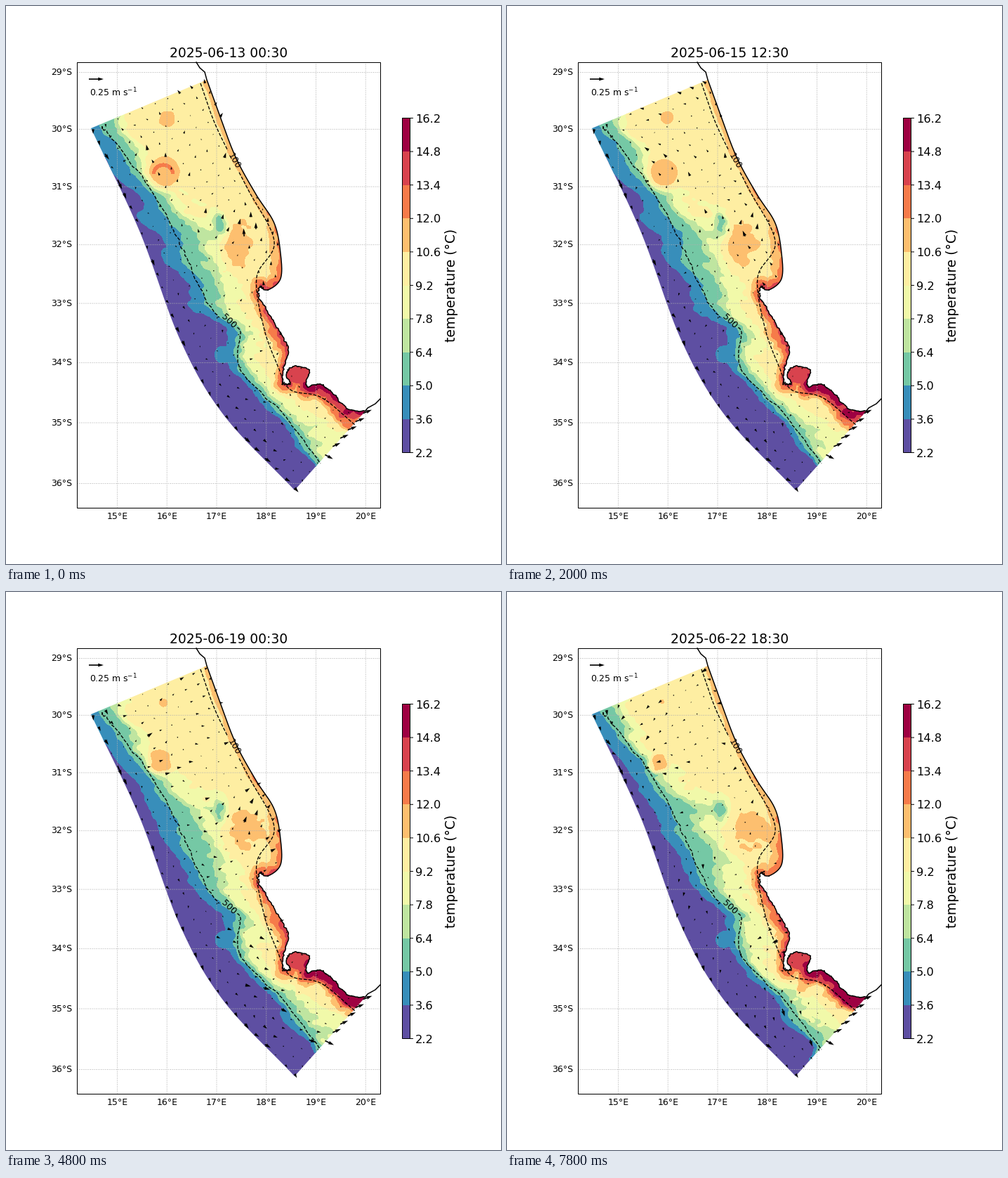
A matplotlib script for the animation above (8 s loop, 705 by 794 pixels).

```python
import numpy as np
import matplotlib.pyplot as plt
from matplotlib.animation import FuncAnimation
from matplotlib.patches import Polygon, Rectangle
from matplotlib.path import Path

W, H, FRAMES = 705, 794, 40
PT = 0.72  # points per pixel at 100 dpi
LEVELS = 2.2 + 1.4 * np.arange(11)
CMAP = plt.get_cmap("Spectral_r", 10)
START = np.datetime64("2025-06-13T00:30")
rng = np.random.default_rng(11)

plt.rcParams["font.family"] = "DejaVu Sans"
fig = plt.figure(figsize=(W / 100, H / 100), dpi=100, facecolor="white")
ax = fig.add_axes([0, 0, 1, 1])
ax.set_xlim(0, W)
ax.set_ylim(H, 0)
ax.axis("off")


def curve(keys, n=20):
    """Catmull-Rom spline through the key points, n samples per span."""
    p = np.array(keys, float)
    q = np.vstack([2 * p[0] - p[1], p, 2 * p[-1] - p[-2]])
    a, b, c, d = q[:-3], q[1:-2], q[2:-1], q[3:]
    t = np.linspace(0, 1, n, endpoint=False)[:, None, None]
    spans = 0.5 * (2 * b + (c - a) * t + (2 * a - 5 * b + 4 * c - d) * t ** 2
                   + (3 * b - a - 3 * c + d) * t ** 3)
    return np.vstack([spans.swapaxes(0, 1).reshape(-1, 2), p[-1]])


def resample(pts, n):
    along = np.r_[0, np.cumsum(np.hypot(*np.diff(pts, axis=0).T))]
    s = np.linspace(0, along[-1], n)
    return np.c_[np.interp(s, along, pts[:, 0]), np.interp(s, along, pts[:, 1])]


def roughen(pts, size):
    noise = rng.normal(0, 1, pts.shape)
    return pts + size * (noise + np.roll(noise, 1, 0) + np.roll(noise, 2, 0)) / 1.7


def line(pts, width, style="-", color="black", z=5):
    ax.plot(*np.transpose(pts), style, color=color, lw=width * PT, zorder=z, snap=False)


def label(x, y, text, px, **kw):
    kw = {"ha": "center", "va": "center", "zorder": 8, **kw}
    return ax.text(x, y, text, fontsize=px * PT, **kw)


def isobath(pts, x, y, text, rotation):
    pts = pts.copy()
    pts[np.hypot(*(pts - [x, y]).T) < 14] = np.nan
    line(pts, 1.3, "--")
    label(x, y, text, 12.5, rotation=rotation)


# Geography, in stage pixels
SMOOTH = curve([(286, 105), (303, 152), (327, 215), (356, 268), (382, 309), (391, 352),
                (391, 388), (373, 404), (362, 399), (360, 413), (371, 433), (389, 462),
                (402, 488), (396, 514), (394, 535), (404, 538), (400, 521), (413, 513),
                (431, 518), (428, 541), (448, 539), (467, 552), (485, 572), (512, 578)])
KNOT = np.arange(len(SMOOTH)) / 20
COAST = np.where(KNOT[:, None] > 7, roughen(SMOOTH, 0.7), SMOOTH)
EDGE = curve([(121, 174), (190, 320), (248, 475), (310, 582), (411, 689)])
INNER = curve([(285, 107), (394, 350), (425, 450), (511, 580)])
SHALLOW = curve([(277, 110), (300, 173), (343, 258), (382, 335), (357, 386), (367, 457),
                 (387, 512), (405, 546), (449, 557), (497, 596)])
DEEP = curve([(135, 171), (152, 190), (208, 263), (241, 325), (265, 375), (296, 436),
              (332, 461), (333, 517), (390, 575), (448, 650)])
DOMAIN = np.vstack([COAST, EDGE[::-1]])

xs, ys = np.arange(116, 520, 2.0), np.arange(100, 696, 2.0)
X, Y = np.meshgrid(xs, ys)

# Distance to the coast, and the place along it that is nearest
shore, place = np.full(X.shape, 1e3), np.zeros(X.shape)
for k, (px, py) in zip(KNOT, COAST):
    d = np.hypot(X - px, Y - py)
    place[d < shore] = k
    shore = np.minimum(shore, d)
PEAK = np.interp(place, [0, 5, 7, 9, 11, 15, 19, 21, 23],
                 [11.7, 12.2, 14.3, 13.2, 14.3, 13.8, 14.8, 16, 16.4])
REACH = np.interp(place, [0, 3, 6, 9, 11, 13, 19, 23], [5, 6, 19, 9, 18, 9, 22, 25])

# The fronts follow the shelf break
down = DEEP[np.argsort(DEEP[:, 1])]
BREAK = np.mean([np.interp(ys + k, down[:, 1], down[:, 0])
                 for k in range(-12, 13, 4)], axis=0)


def make_waves(n, short, long):
    turn, size = rng.uniform(0, 2 * np.pi, n), rng.uniform(short, long, n)
    return np.c_[2 * np.pi * np.cos(turn) / size, 2 * np.pi * np.sin(turn) / size,
                 rng.uniform(0, 2 * np.pi, n), rng.normal(0, 0.07, n)]


def ripple(waves, x, y, i):
    total = sum(np.sin(kx * x + ky * y + ph + w * i) for kx, ky, ph, w in waves)
    return total / np.sqrt(len(waves))


BROAD, FINE = make_waves(9, 28, 75), make_waves(8, 13, 30)
SWIRL_U, SWIRL_V = make_waves(8, 45, 110), make_waves(8, 45, 110)


def shelf_water(x, t):
    s = (ys - 170) / 490
    bulge = np.exp(-((ys - 355) / 75) ** 4)
    corner = 14 * np.exp(-((ys - 165) / 25) ** 2)
    cape = 50 / (1 + np.exp((592 - ys) / 7))
    spread = 32 * t * np.exp(-((ys - 305) / 32) ** 2)
    offsets = [-92 + 25 * s, -32 + 25 * s, -4 + 0 * s,
               7 + (24 - 4 * t) * bulge + corner, 13 + 31 * bulge + corner,
               24 + 14 * s + 38 * bulge + corner + cape + spread]
    knots = BREAK + np.array(offsets + [offsets[-1] + 35])
    temps = [2.5, 3.6, 5.0, 6.4, 7.8, 9.2, 9.9]
    return np.array([np.interp(row, k, temps) for row, k in zip(x, knots.T)])


def temperature(i):
    t = i / (FRAMES - 1)
    a, b = ripple(BROAD, X, Y, i), ripple(FINE, X, Y, i)
    T = shelf_water(X + (2.6 * a + 1.6 * b) * np.clip((X - 130) / 60, 0.3, 1), t)
    T += (0.4 * a + 0.3 * b) * np.exp(-((T - 7.6) / 1.8) ** 2) + 0.08 * a

    def blend(goal, cx, cy, rx, ry, power, rough=0.0):
        r = np.hypot((X - cx) / rx, (Y - cy) / ry) + rough * (a + b)
        T[:] += (goal - T) * np.exp(-np.abs(r) ** power)

    # Eddy with a warm arc, northern patch, warm pool, cool spots, enclosed bay
    ex, ey, er = 224 - 8 * t, 237 + 5 * t, 25 - 13 * t ** 1.3
    blend(11.3, ex, ey, er, er, 4, 0.15 * t)
    arc = np.exp(-((np.hypot(X - ex, Y - ey - 3) - 14) / 2.6) ** 2) * (Y < ey + 2)
    T += 1.5 * arc * np.exp(-i / 2.5)
    blend(11.2, 230 - 9 * t, 160 - 4 * t, 12 - 9 * t, 11 - 8 * t, 3, 0.15)
    blend(11.3, 329 + 15 * t, 338, 23 + 11 * t, 42 - 12 * t, 2.6, 0.2)
    blend(5.4, 304, 311, 11 - 2 * t, 17, 2, 0.2)
    blend(4.6, 307, 495, 8, 9, 3)
    blend(14.2, 416, 525, 18, 15, 6)

    hot = PEAK + 1.3 * t * np.clip(place - 18, 0, 1)
    near = shore + 0.12 * REACH * (a + b)
    return np.maximum(T, 10.6 + (hot - 10.6) * (1 - near / REACH))


# Arrow positions on the curvilinear model grid
ROWS, COLS = 30, 10
across = np.linspace(0.012, 0.985, COLS)[None, :, None]
edge = resample(EDGE, ROWS)
grid = edge[:, None] * (1 - across) + resample(INNER, ROWS)[:, None] * across
tangent = np.gradient(edge, axis=0)
tangent /= np.hypot(*tangent.T)[:, None]
grid[0] += [1, 2]
grid[-1] -= [1, 2]
inside = Path(DOMAIN).contains_points(grid.reshape(-1, 2)).reshape(ROWS, COLS)
gx, gy = grid[inside].T
row, col = (k[inside] for k in np.indices((ROWS, COLS)))
strength = rng.gamma(2.2, 0.45, len(gx))


def current(i):
    u = 2 * ripple(SWIRL_U, gx, gy, i)
    v = 2 * ripple(SWIRL_V, gx, gy, i)
    # Inertial rotation, a little over a quarter turn per step
    turn = np.radians(90 + 104.5 * i + 120 * np.sin(2 * np.pi * i / 26))
    turn = turn + 0.4 * np.sin(gx / 40 + gy / 60)
    shelf = np.where(gy < 270, 3.4, 2.0) * strength * np.minimum(1, col / 3)
    u += shelf * np.cos(turn)
    v -= shelf * np.sin(turn)
    jet = 6.5 * np.exp(-(col / 1.1) ** 2) * (0.5 + 0.5 * strength)
    jet += 3.5 * strength * np.exp(-((col - 3) / 1.5) ** 2) * (gy > 340)
    u += jet * tangent[row, 0]
    v += jet * tangent[row, 1]
    pool = 5 * np.exp(-((gx - 345) / 42) ** 2 - ((gy - 330) / 48) ** 2)
    u += 0.5 * pool
    v -= pool
    outlet = (row == ROWS - 1) & (col > 3)
    u[outlet] = 12 + np.sin(col[outlet] + i / 5)
    v[outlet] = np.where(col[outlet] == 4, 6, -5)
    return u, v


def mercator(lat):
    return np.log(np.tan(np.pi / 4 + np.radians(lat) / 2))


# Map frame, graticule and labels
for n in range(6):
    x = 158.5 + 70.75 * n
    line([(x, 80), (x, 714)], 1, ":", "#b0b0b0", 3)
    label(x, 727, f"{15 + n}°E", 12.5)
for lat in range(29, 37):
    y = np.interp(mercator(lat), mercator(np.array([29, 36])), [94.5, 679.5])
    line([(101.5, y), (533.5, y)], 1, ":", "#b0b0b0", 3)
    label(94, y, f"{lat}°S", 12.5, ha="right")
ax.add_patch(Rectangle((101.5, 80.5), 432, 634, fill=False, lw=PT, zorder=7, snap=False))
title = label(317, 73, "", 18.75, va="baseline")

sea = Polygon(DOMAIN, fc="none", ec="none")
ax.add_patch(sea)
isobath(SHALLOW, 325, 221, "100", -60)
isobath(roughen(DEEP, 0.8), 317, 449, "500", -43)
line(np.vstack([[(271, 80), (276, 88), (283, 94)], COAST,
                [(515, 572), (526, 566), (533, 559)]]), 1.5)

# Colour bar
TOP, BASE = 159.5, 635.5
step = (BASE - TOP) / 10
for n, level in enumerate(LEVELS):
    y = BASE - n * step
    if n < 10:
        ax.add_patch(Rectangle((564.5, y - step), 11, step, fc=CMAP(n), lw=0))
    line([(575.5, y), (579.5, y)], 1)
    label(583, y, f"{level:.1f}", 16.25, ha="left", va="center_baseline")
ax.add_patch(Rectangle((564.5, TOP), 11, BASE - TOP, fill=False, lw=PT, zorder=6,
                       snap=False))
label(634, 397, "temperature (°C)", 18.75, rotation=90)

arrow = dict(angles="xy", units="xy", scale_units="xy", scale=1, width=1.65, zorder=6)
ax.quiver([118], [104], [21], [0], **arrow)
label(119, 128, "0.25 m s$^{-1}$", 12.5, ha="left", va="baseline")
flow = ax.quiver(gx, gy, *current(0), **arrow)
fill = []


def update(i):
    while fill:
        fill.pop().remove()
    T = np.clip(temperature(i), LEVELS[0] + 0.01, LEVELS[-1] - 0.01)
    bands = ax.contourf(X, Y, T, levels=LEVELS, cmap=CMAP, zorder=2)
    bands.set_clip_path(sea)
    fill.append(bands)
    ax.set_xlim(0, W)
    ax.set_ylim(H, 0)
    flow.set_UVC(*current(i))
    title.set_text(str(START + np.timedelta64(6 * i, "h")).replace("T", " "))
    return bands, flow, title


anim = FuncAnimation(fig, update, frames=FRAMES, interval=200, repeat=True,
                     repeat_delay=0, blit=False)
plt.show()
```
